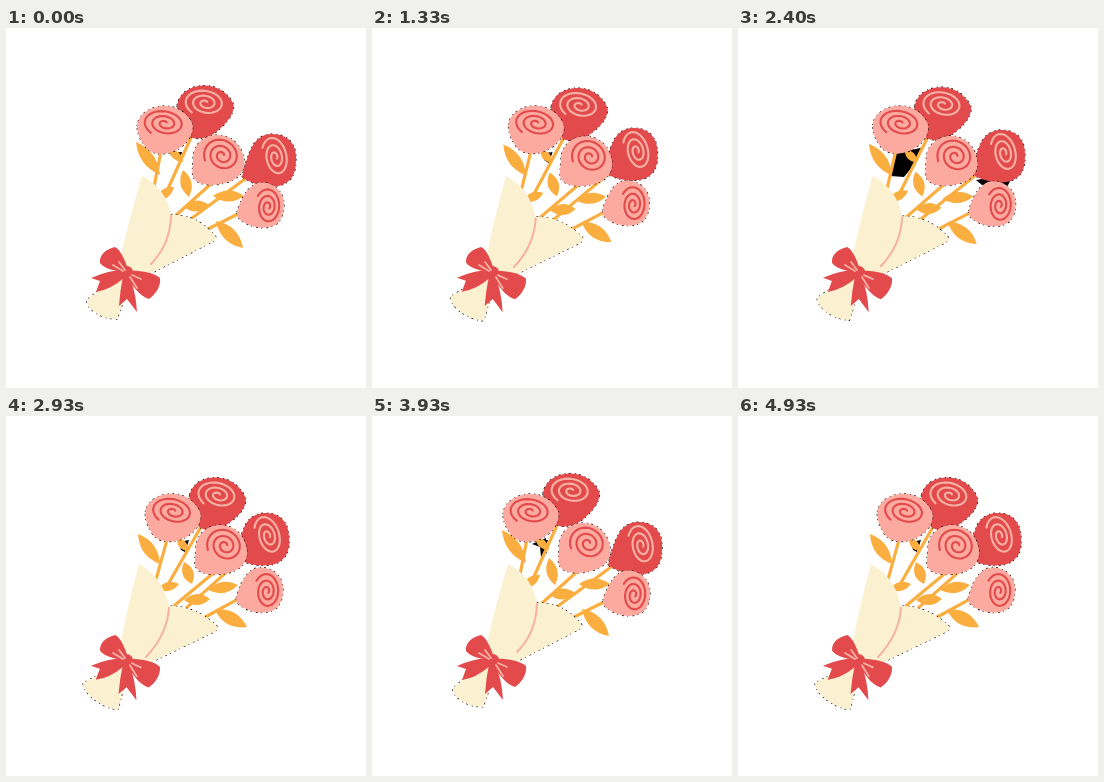
Recreate the animation shown at these times as an HTML page. Size 360x360 px, loop 5 s.

```html
<!DOCTYPE html>
<html lang="en">
<head>
<meta charset="utf-8">
<title>Swaying bouquet</title>
<style>
html, body { margin: 0; width: 100%; height: 100%; overflow: hidden; background: #fff; }
svg { display: block; width: 100vw; height: 100vh; }
</style>
</head>
<body>
<svg id="stage" viewBox="0 0 360 360"></svg>
<script>
const LOOP = 5000, SWAY = 2000, LEFT_AT = 1933;
const RED = '#e24a4c', PINK = '#fcaa9f', ORANGE = '#fbae40', CREAM = '#fbf1d0', BLUSH = '#f7b0a4';
const stage = document.getElementById('stage');
const updates = [];

function add(tag, attrs, parent = stage) {
  const el = document.createElementNS('http://www.w3.org/2000/svg', tag);
  for (const k in attrs) el.setAttribute(k, attrs[k]);
  parent.append(el);
  return el;
}

const line = (d, color, width, parent) => add('path', {
  d, fill: 'none', stroke: color, 'stroke-width': width, 'stroke-linecap': 'round'
}, parent);

// Fine dotted dark rim behind a filled shape
const rim = { stroke: '#1a1010', 'stroke-width': 1.2, 'stroke-dasharray': '1.2 3 2 4', 'paint-order': 'stroke' };

// Blends the numbers of two paths of the same structure
function morph(el, from, to) {
  const ends = to.match(/-?[\d.]+/g).map(Number);
  updates.push(u => {
    let i = 0;
    el.setAttribute('d', from.replace(/-?[\d.]+/g, n => (+n + (ends[i++] - n) * u).toFixed(2)));
  });
}

function leafPath([x0, y0, x1, y1], w) {
  const mx = (x0 + x1) / 2, my = (y0 + y1) / 2, len = Math.hypot(x1 - x0, y1 - y0);
  const nx = (y0 - y1) / len * w, ny = (x1 - x0) / len * w;
  return `M${x0} ${y0}Q${mx + nx} ${my + ny} ${x1} ${y1}Q${mx - nx} ${my - ny} ${x0} ${y0}Z`;
}

function leaf(w, from, to) {
  const el = add('path', { fill: ORANGE });
  morph(el, leafPath(from, w), leafPath(to, w));
}

function spiral(cx, cy, rx, ry, tilt, start) {
  const steps = 70, turns = 2.5, c = Math.cos(tilt), s = Math.sin(tilt);
  let d = '';
  for (let i = 0; i <= steps; i++) {
    const p = i / steps, r = 1 - 0.88 * p, a = start + p * turns * 2 * Math.PI;
    const x = rx * r * Math.cos(a), y = ry * r * Math.sin(a);
    d += (i ? 'L' : 'M') + (cx + x * c - y * s).toFixed(2) + ' ' + (cy + x * s + y * c).toFixed(2);
  }
  return d;
}

function flower({ turn, stem, head, fill, ink, curl }) {
  const g = add('g', {});
  line(stem, ORANGE, 3.2, g);
  add('path', { d: head, fill, ...rim }, g);
  line(spiral(...curl), ink, 2.1, g);
  updates.push(u => g.setAttribute('transform', `rotate(${turn * u} 163 205)`));
}

// Dark gaps between the stems
const gapWide = add('path', { d: 'M157 126L186 119L176 137L166 149L152 148Z' });
const gapSide = add('path', { d: 'M238 152L276 146L270 157L244 157Z' });
const gapSlim = add('path', { d: 'M160 128L174 122L175 137L169 141L168 131Z' });
const gapDot = add('path', {});
morph(gapDot, 'M163 125L176 124L173 133L168 130Z', 'M173 126L183 124L179 136L175 134Z');

leaf(12, [154, 147, 130, 114], [154, 148, 132, 118]);
leaf(11, [183, 169, 177, 142], [186, 168, 178, 146]);
leaf(9, [150, 172, 168, 159], [152, 173, 173, 168]);
leaf(11, [178, 179, 203, 177], [178, 184, 204, 183]);
leaf(11, [207, 168, 238, 168], [202, 174, 232, 169]);
leaf(13, [210, 193, 237, 220], [209, 194, 241, 211]);
leaf(8, [177, 134, 163, 121], [182, 135, 171, 122]);

flower({
  turn: -5.2, fill: RED, ink: BLUSH, stem: 'M239 151L182 193',
  head: 'M236 149C239 136 244 119 251 112C259 105 268 105 277 108C287 112 291 122 290 133C290 145 286 155 273 158C260 160 246 156 236 149Z',
  curl: [269.5, 129.5, 21, 13, 1.35, 2.2]
});
flower({
  turn: 5.7, fill: RED, ink: BLUSH, stem: 'M186 107L156 174',
  head: 'M171 77C173 65 184 58 197 57.5C210 57 221 64 227 75C230 85 219 97 210 104C203 110 190 113 183 108C177 99 170 87 171 77Z',
  curl: [199.5, 75, 21, 14, 0.15, 2.2]
});
flower({
  turn: -2, fill: PINK, ink: RED, stem: 'M236 184L198 203',
  head: 'M231 184C234 173 240 161 249 156C259 152 271 157 276 167C280 176 278 188 272 195C264 202 249 201 239 195C234 192 230 189 231 184Z',
  curl: [262, 179, 18.5, 13, 1.6, 2.2]
});
flower({
  turn: 4.4, fill: PINK, ink: RED, stem: 'M155 123L146 169',
  head: 'M131 98C132 87 143 79 156 78C169 77 181 84 186 95C189 105 181 116 172 121C162 127 149 128 141 121C135 114 131 106 131 98Z',
  curl: [159, 95.5, 21.5, 14, 0.15, 2.2]
});
flower({
  turn: 2.3, fill: PINK, ink: RED, stem: 'M207 154L168 189',
  head: 'M187 130C187 117 198 107 211 107C226 107 236 118 238 131C240 143 232 152 219 155C208 158 194 158 188 151C185 146 187 138 187 130Z',
  curl: [216, 127.5, 19, 17, 0.6, 2.2]
});

// Paper wrap
const flap = add('path', { fill: CREAM, ...rim });
morph(flap, 'M160 187Q190 184 210 209Q209 213 204 215L146 245L124 246Z',
  'M160 190Q190 189 212 211Q211 215 206 217L146 246L124 246Z');
const sheet = add('path', { fill: CREAM });
morph(sheet, 'M136 148Q160 160 165 187Q163 217 145 237L122 246L113 236Q124 187 136 148Z',
  'M133 148Q158 162 163 191Q160 218 140 241L122 246L113 236Q122 187 133 148Z');
const fold = line('', BLUSH, 2);
morph(fold, 'M165 188Q164 217 145 236', 'M163 192Q161 219 140 241');
const tail = add('path', { fill: CREAM, ...rim });
morph(tail, 'M117 247Q99 256 81 272Q80 277 86 282Q96 291 111 291Q119 272 122 249Z',
  'M117 247Q97 256 77 267Q77 272 83 279Q95 291 112 294Q118 272 122 249Z');

// Ribbon
const bow = add('g', { fill: RED });
for (const d of [
  'M118 242Q103 242 85 250L94 253L90 264Q104 262 118 250Z',
  'M117 248Q114 263 113 278L121 271L131 284Q130 264 123 247Z',
  'M119 244C110 243 98 241 94 235C93 227 100 221 109 219C115 222 119 233 122 241Z',
  'M121 243C132 242 147 244 154 250C155 258 150 266 143 271C133 268 126 257 121 248Z',
  'M116 244Q116 238 122 238Q128 240 127 246Q124 252 118 249Z'
]) add('path', { d }, bow);
line('M107 237L117 243M113 234L119 242M124 249L131 260M126 247L135 251', BLUSH, 1.8, bow);
updates.push(u => bow.setAttribute('transform', `rotate(${0.8 * u} 108 243)`));

const show = (el, on) => el.setAttribute('visibility', on ? 'visible' : 'hidden');

function draw(t) {
  // Poses are held alternately for 130 and 70 ms
  const part = t % 200;
  const held = t - part + (part < 130 ? 0 : 133);
  const phase = held % SWAY;
  const u = (1 - Math.cos((held - LEFT_AT) / SWAY * 2 * Math.PI)) / 2;
  const wide = phase >= 320 && phase <= 540;
  show(gapWide, wide);
  show(gapSide, wide);
  show(gapSlim, phase > 1720 && phase < 1950);
  for (const update of updates) update(u);
}

const begin = performance.now();
function tick() {
  draw((performance.now() - begin) % LOOP);
  requestAnimationFrame(tick);
}
tick();
</script>
</body>
</html>
```
